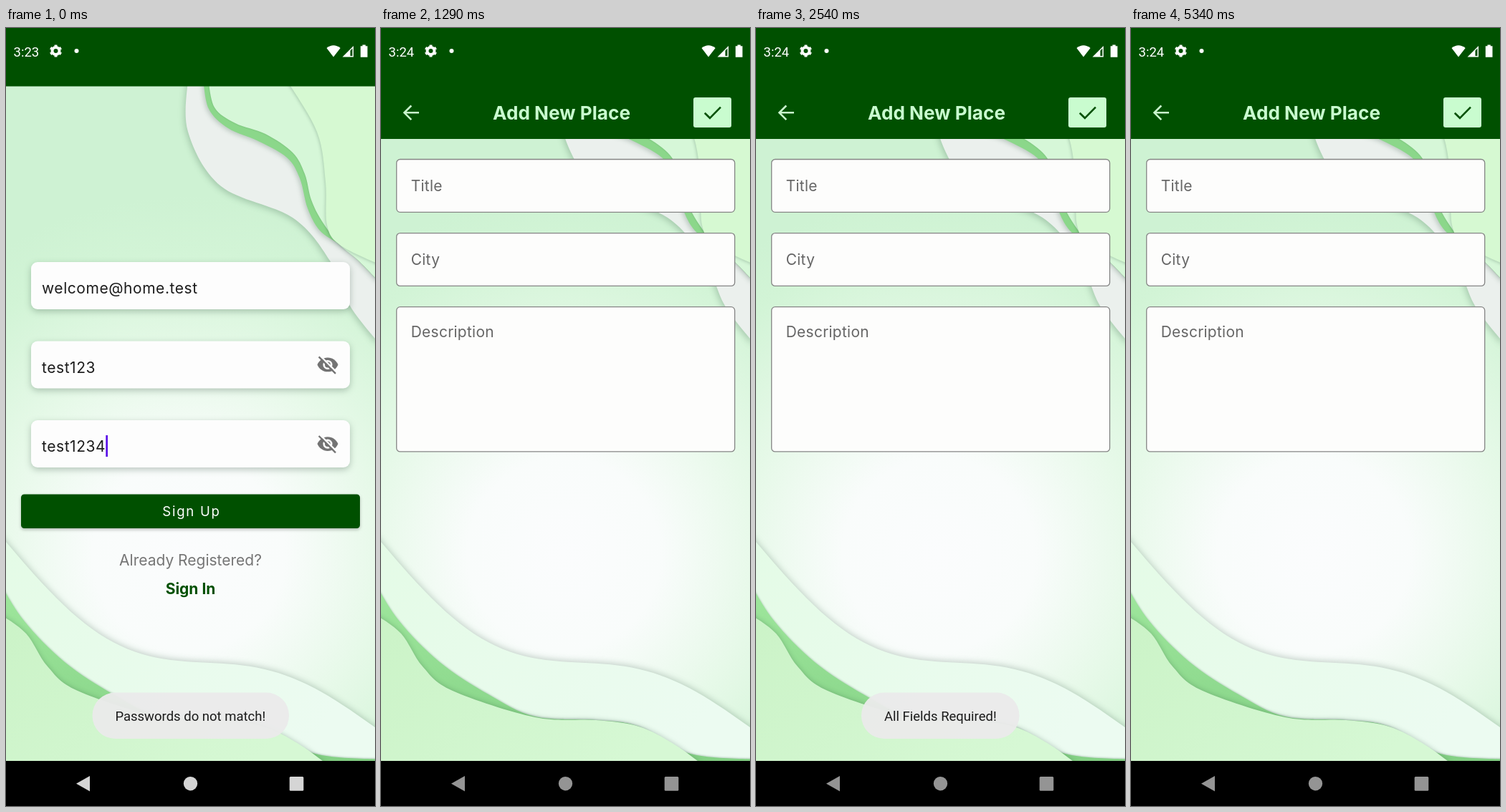
These frames come from a looping animation (515x1087 px, 5.39 s). An HTML page:

```html
<!DOCTYPE html>
<html lang="en">
<head>
<meta charset="utf-8">
<title>Form validation</title>
<style>
html, body { margin: 0; width: 100%; height: 100%; overflow: hidden; background: #000; }
svg { display: block; width: 515px; height: 1087px; }
text { font: 400 21px Inter, sans-serif; }
.mid { text-anchor: middle; }
.roboto { font: 400 18.5px Roboto, sans-serif; }
.input { fill: #1c1c1c; letter-spacing: .55px; }
.hint { fill: #666; letter-spacing: .25px; }
.card { fill: #fdfdfd; filter: drop-shadow(0 3px 5px rgba(20, 50, 35, .27)); }
.box { fill: #fdfdfc; stroke: #858585; stroke-width: 1.3; }
.line { fill: none; stroke-width: 2.6; }
.bar { fill: #005000; }
.pill { fill: #ebebeb; fill-opacity: .96; }
</style>
</head>
<body>
<svg viewBox="0 0 515 1087" xmlns="http://www.w3.org/2000/svg">
  <defs>
    <radialGradient id="glow" gradientUnits="userSpaceOnUse" cx="255" cy="735" r="500">
      <stop offset="0" stop-color="#fbfcfd"/>
      <stop offset=".27" stop-color="#f9fcfb"/>
      <stop offset=".55" stop-color="#e6f9e8"/>
      <stop offset=".85" stop-color="#d2f4d6"/>
      <stop offset="1" stop-color="#cef2d3"/>
    </radialGradient>
    <linearGradient id="ribbon" x2="1" y2=".4">
      <stop stop-color="#e4fbe6"/>
      <stop offset="1" stop-color="#ecfbf1"/>
    </linearGradient>
    <linearGradient id="hill" x2="1" y2=".5">
      <stop stop-color="#cbf3c7"/>
      <stop offset="1" stop-color="#d6f8d4"/>
    </linearGradient>
    <linearGradient id="leaf" x2="0" y2="1">
      <stop stop-color="#a0e89e"/>
      <stop offset="1" stop-color="#82cf83"/>
    </linearGradient>
    <clipPath id="view"><path d="M0 81H515V1024H0Z"/></clipPath>
    <g id="eye" stroke-width="1.8">
      <path d="M1 12C2.7 7.6 7 4.5 12 4.5S21.3 7.6 23 12C21.3 16.4 17 19.5 12 19.5S2.7 16.4 1 12Z" fill="#737373"/>
      <circle cx="12" cy="12" r="4" fill="#737373" stroke="#fdfdfd" stroke-width="2"/>
      <path d="M5 3.45L22 20.45" stroke="#fdfdfd"/>
      <path d="M2.6 3.6L20.4 21.4" stroke="#737373"/>
    </g>
  </defs>

  <g clip-path="url(#view)">
    <path d="M0 81H515V1024H0Z" fill="url(#glow)"/>
    <g id="waves"></g>
  </g>
  <path class="bar" d="M0 0H515V81.5H0Z"/>

  <g id="signup">
    <g id="cards"></g>
    <path d="M139.3 569H142V599H139.3Z" fill="#5a10e8"/>
    <use href="#eye" transform="translate(433.2 454.7) scale(1.314)"/>
    <use href="#eye" transform="translate(433.2 565.3) scale(1.314)"/>
    <rect class="bar" x="21" y="651.5" width="473" height="47.5" rx="4.5" style="filter:drop-shadow(0 2px 2px rgba(0,0,0,.25))"/>
    <text class="mid" x="259" y="682.3" fill="#fff" style="font-size:18.6px;letter-spacing:1.75px">Sign Up</text>
    <text class="mid" x="257.5" y="750.5" fill="#757575">Already Registered?</text>
    <text class="mid" x="257.5" y="791" fill="#005000" style="font-weight:700">Sign In</text>
    <rect class="pill" x="120.5" y="928.5" width="274.5" height="64.5" rx="32"/>
    <text class="mid roboto" x="257.3" y="968" fill="#1b1b1b">Passwords do not match!</text>
  </g>

  <g id="place">
    <path class="bar" d="M0 80H515V155H0Z"/>
    <path class="line" stroke="#c9f6cd" d="M53 118.3H33M42.3 108.5L32.5 118.3L42.3 128.1"/>
    <text class="mid" x="252" y="128.3" fill="#c9fccf" style="font-size:26.2px;font-weight:700">Add New Place</text>
    <rect x="436" y="97" width="53" height="42" rx="3" fill="#c9fccf"/>
    <rect id="press" x="436" y="97" width="53" height="42" rx="3" fill="#b2dfb6"/>
    <path class="line" stroke="#005000" d="M451.8 118.7L459 125.8L474 110.6"/>
    <g id="boxes"></g>
    <g id="toast">
      <rect class="pill" x="147" y="928.5" width="220.5" height="64.5" rx="32"/>
      <text class="mid roboto" x="257.3" y="968" fill="#1b1b1b">All Fields Required!</text>
    </g>
  </g>

  <g fill="#fff">
    <text class="roboto" id="clockA" x="10.5" y="39.5">3:23</text>
    <text class="roboto" id="clockB" x="10.5" y="39.5">3:24</text>
    <g fill="none" stroke="#fff">
      <circle cx="69.5" cy="32" r="5" stroke-width="4"/>
      <circle cx="69.5" cy="32" r="7.3" stroke-width="2.6" pathLength="12" stroke-dasharray="1 1" stroke-dashoffset="-.5"/>
    </g>
    <circle cx="98.5" cy="32" r="3"/>
    <path d="M447.5 28Q457 20.5 466.7 28L457 40.5Z"/>
    <path d="M469.5 40.5L485 25V40.5ZM480.5 31.5V39H483.5V28.6Z" fill-rule="evenodd"/>
    <path d="M497.5 23.5H501.8V25.3H504.5V40.7H494.8V25.3H497.5Z"/>
  </g>

  <path d="M0 1024H515V1087H0Z"/>
  <g id="nav" fill="#d5d5d5">
    <path d="M98 1055.7L117 1045V1066.4Z"/>
    <circle cx="257.5" cy="1055.7" r="9.7"/>
    <rect x="395.7" y="1046" width="19.6" height="19.8" rx="1.5"/>
  </g>
</svg>
<script>
const LOOP = 5390, SWITCH = 1090;
const $ = id => document.getElementById(id);

function add(parent, tag, attrs, text = "") {
  const el = document.createElementNS("http://www.w3.org/2000/svg", tag);
  for (const k in attrs) el.setAttribute(k, attrs[k]);
  el.textContent = text;
  $(parent).append(el);
  return el;
}

// Smooth curve through "x,y" key points
function curve(points) {
  const p = points.split(" ").map(s => s.split(",").map(Number));
  let d = "M" + p[0];
  for (let i = 0; i < p.length - 1; i++) {
    const b = p[i], c = p[i + 1], a = p[i - 1] || b, e = p[i + 2] || c;
    const near = b.map((v, k) => v + (c[k] - a[k]) / 6);
    const far = c.map((v, k) => v - (e[k] - b[k]) / 6);
    d += `C${near} ${far} ${c}`;
  }
  return d;
}

// Sheet edge from x = 0 to 515: a slope plus two half-wave harmonics
function swell(from, to, a, b) {
  let d = "";
  for (let x = -10; x <= 530; x += 10) {
    const u = x / 515, w = Math.PI * u;
    d += `${d ? "L" : "M"}${x},${from + (to - from) * u + a * Math.sin(w) + b * Math.sin(2 * w)}`;
  }
  return d;
}

function sheet(edge, corner, fill, shadow) {
  const el = add("waves", "path", { d: edge + corner + "Z", fill });
  el.style.filter = `drop-shadow(${shadow} rgba(20,60,35,.22))`;
}

// Upper corner, back to front; the last sheets share one tail
const UP = "L545,70", TAIL = " 466,303 492,325 520,354";
sheet(curve("254,70 254,145 300,221 400,265 452,325 480,388 520,440"), UP, "#ebf0ed", "-2px 3px 4px");
sheet(curve("275,70 283,113 310,140 352,158 392,181 410,210 421,252 438,283" + TAIL), UP, "#8bd78a", "-2px 2px 3px");
sheet(curve("282,70 291,111 320,133 362,148 400,174 417,204 426,240 441,270" + TAIL), UP, "#d6f7d8", "0 0 1px");
sheet(curve("390,70 434,145 446,215 448,275 466,303 520,330"), UP, "#d6f9d2", "-1px 1px 2px");

// Lower corner: ribbon, then the leaf and hill lying over its foot
const DOWN = "L530,1040L-10,1040";
sheet(swell(718, 977, 38, 36), DOWN, "url(#ribbon)", "0 -2px 4px");
sheet(curve("-10,772 25,828 82,886 150,931 215,962 300,967 360,976 432,1014 530,1022"), DOWN, "url(#leaf)", "0 -1px 1px");
sheet(curve("-10,818 28,846 58,892 100,926 215,963 300,967 360,976 408,1000 446,1027"), "L-10,1040", "url(#hill)", "0 -1px 3px");

["welcome@home.test", "test123", "test1234"].forEach((value, i) => {
  const y = 327 + 110.5 * i;
  add("cards", "rect", { class: "card", x: 35, y, width: 445, height: 66, rx: 9 });
  add("cards", "text", { class: "input", x: 50, y: y + 44 }, value);
});

["Title", "City", "Description"].forEach((label, i) => {
  const y = 183.5 + 103.1 * i, tall = i === 2;
  add("boxes", "rect", { class: "box", x: 21.7, y, width: 472, height: tall ? 202.2 : 73.8, rx: 5 });
  add("boxes", "text", { class: "hint", x: 41.7, y: y + (tall ? 42.3 : 44.5) }, label);
});

// Steps are [time, value]; a repeated time is a hard change
function play(id, prop, steps) {
  const all = [[0, steps[0][1]], ...steps, [LOOP, steps[steps.length - 1][1]]];
  $(id).animate(
    all.map(([t, v]) => ({ offset: t / LOOP, [prop]: v })),
    { duration: LOOP, iterations: Infinity }
  );
}
const cut = (a, b) => [[SWITCH, a], [SWITCH, b]];
const pulse = (start, rise, end, fall) => [[start, 0], [start + rise, 1], [end, 1], [end + fall, 0]];

for (const id of ["signup", "clockA"]) play(id, "opacity", cut(1, 0));
for (const id of ["place", "clockB"]) play(id, "opacity", cut(0, 1));
play("nav", "fill", cut("#d5d5d5", "#949494"));
play("press", "opacity", pulse(1300, 90, 1500, 250));
play("toast", "opacity", pulse(1500, 180, 3650, 180));
</script>
</body>
</html>
```
